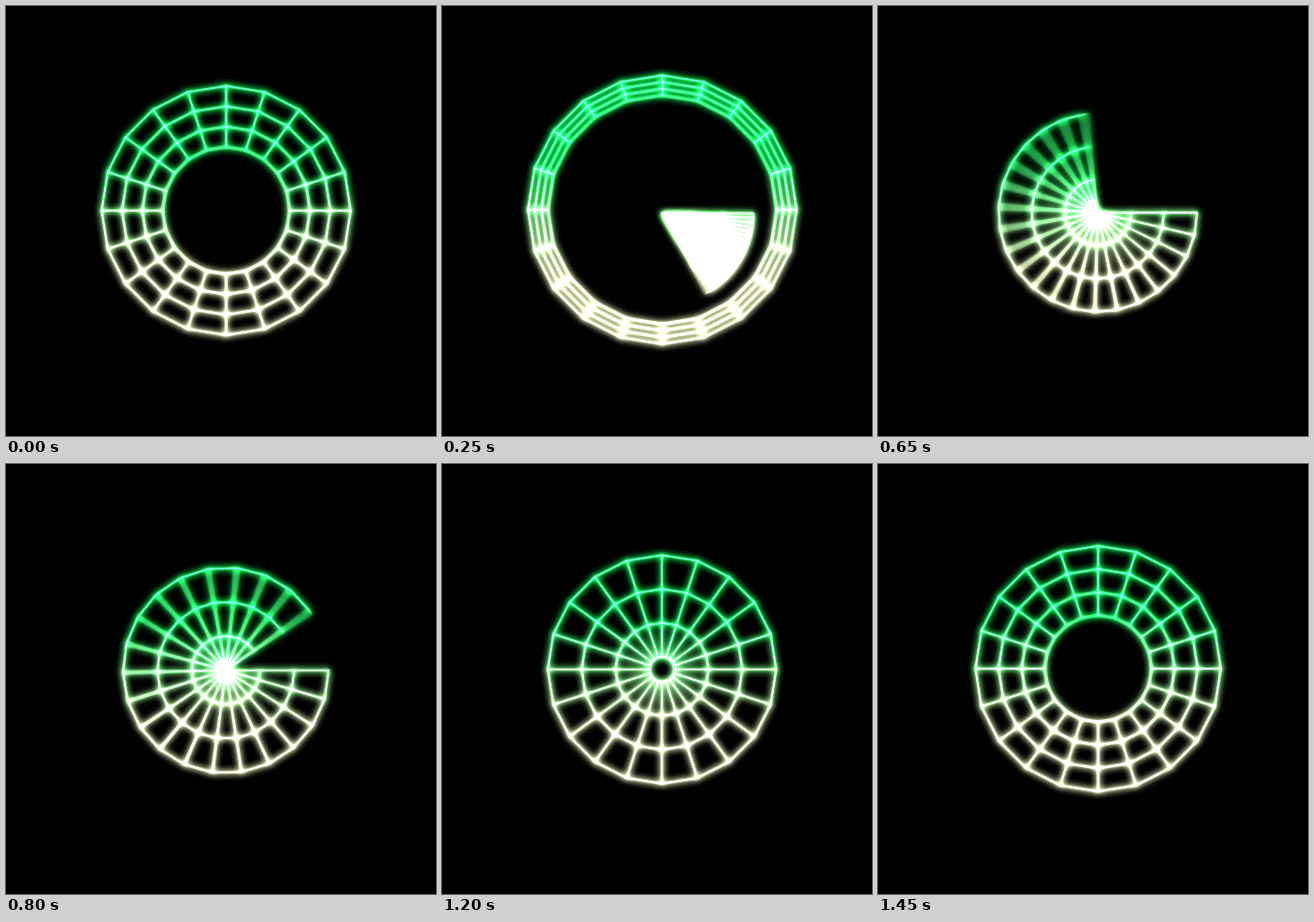
Write an HTML page with a canvas that moves like this. It is 460 by 460 pixels and loops after 1.5 s.

```html
<!DOCTYPE html>
<html>
<head>
<meta charset="utf-8">
<style>
html, body { margin: 0; height: 100%; overflow: hidden; background: #000; }
canvas { display: block; }
</style>
</head>
<body>
<canvas id="stage" width="460" height="460"></canvas>
<script>
const SIZE = 460, LOOP = 1500, STEP = 50;
const LIFE = 2000;       // one disc sweeps open, then hollows out into a ring
const SHUTTER = 15, SAMPLES = 15;
const SPOKES = 20, RINGS = 3;

const ctx = document.getElementById('stage').getContext('2d');
const lineCanvas = document.createElement('canvas');
lineCanvas.width = lineCanvas.height = SIZE;
const lines = lineCanvas.getContext('2d');

function verticalTint(top, bottom) {
  const tint = lines.createLinearGradient(0, 165, 0, 285);
  tint.addColorStop(0, top);
  tint.addColorStop(1, bottom);
  return tint;
}
const glowTint = verticalTint('rgb(8,225,75)', 'rgb(236,242,185)');
const coreTint = verticalTint('rgb(90,240,140)', 'rgb(250,255,220)');

function ease(x) {
  x = Math.min(1, Math.max(0, x));
  return x * x * (3 - 2 * x);
}

function strokeDisc(age) {
  const d = age - 250;
  const outer = 98 + 0.0165 * d + 9.17e-6 * d * d;
  const inner = outer * ease((age - 1000) / 1000);
  const sweep = 2 * Math.PI * ease(age / 1000);
  const cx = 235 + 0.015 * (outer - 98);
  const cy = 221.7 - 0.083 * (outer - 98);
  const point = (i, r) => {
    const a = sweep * i / SPOKES;
    return [cx + r * Math.cos(a), cy + r * Math.sin(a)];
  };

  lines.beginPath();
  for (let i = 0; i <= SPOKES; i++) {
    lines.moveTo(...point(i, inner));
    lines.lineTo(...point(i, outer));
  }
  lines.stroke();

  // Rings are stroked one by one so that they add up where they meet.
  for (let k = 0; k <= RINGS; k++) {
    const r = inner + (outer - inner) * k / RINGS;
    lines.beginPath();
    for (let i = 0; i <= SPOKES; i++) lines.lineTo(...point(i, r));
    lines.stroke();
  }
}

function drawDisc(age) {
  if (age <= 0 || age > LIFE) return;
  for (let s = 0; s < SAMPLES; s++) strokeDisc(age + SHUTTER * s / SAMPLES);
}

function clear(target) {
  target.globalCompositeOperation = 'source-over';
  target.globalAlpha = 1;
  target.filter = 'none';
  target.fillStyle = '#000';
  target.fillRect(0, 0, SIZE, SIZE);
  target.globalCompositeOperation = 'lighter';
}

function drawLines(t, tint) {
  clear(lines);
  lines.globalAlpha = 1 / SAMPLES;
  lines.strokeStyle = tint;
  lines.lineWidth = 1.3;
  lines.lineJoin = 'round';
  drawDisc(t);
  drawDisc(t + LOOP);
}

function addLines(filter) {
  ctx.filter = filter;
  ctx.drawImage(lineCanvas, 0, 0);
}

function render(t) {
  clear(ctx);
  drawLines(t, glowTint);
  addLines('blur(3.5px) brightness(4)');
  drawLines(t, coreTint);
  addLines('blur(1px)');
  addLines('none');
}

let shown = -1;
function tick() {
  const t = Math.floor(performance.now() % LOOP / STEP) * STEP;
  if (t !== shown) render(shown = t);
  requestAnimationFrame(tick);
}
tick();
</script>
</body>
</html>
```
